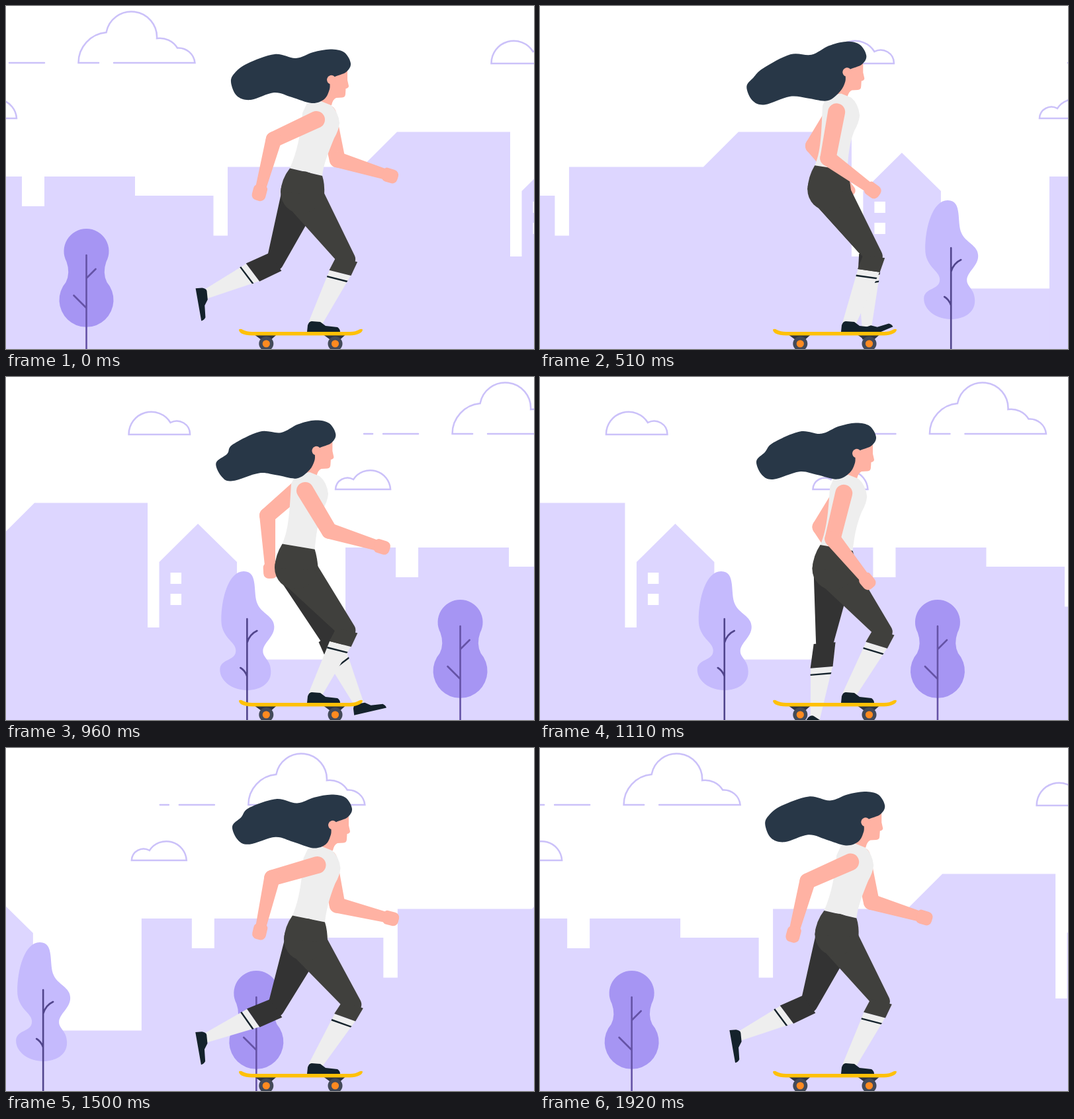
Recreate the animation shown at these times as an HTML page with a canvas. Size 798 by 519 pixels, loop 1950 ms.

```html
<!DOCTYPE html>
<html lang="en">
<head>
<meta charset="utf-8">
<title>Skateboarder</title>
<style>
  html, body { margin: 0; width: 100%; height: 100%; overflow: hidden; background: #fff; }
  canvas { display: block; }
</style>
</head>
<body>
<canvas id="stage" width="798" height="519"></canvas>
<script>
const ctx = document.getElementById('stage').getContext('2d');
const STEP = 30, STEPS = 65, LOOP = STEP * STEPS, SPAN = 1113;
const TIMES = [0, 300, 720, 960, 1260, 1500];

const SKIN = '#ffb2a3', HAIR = '#283747', SHIRT = '#eeeeee', SHOE = '#14222b';
const PANTS = '#40403d', PANTS_FAR = '#333333';
const CITY = '#ddd6ff', CLOUD = '#cbc1f9';

// Periodic, overshoot-free cubic interpolation between key values.
function track(...rows) {
  const n = rows.length;
  const time = j => TIMES[(j + n) % n] + Math.floor(j / n) * LOOP;
  const row = j => rows[(j + n) % n];
  return t => {
    let i = n - 1;
    while (TIMES[i] > t) i--;
    const h = time(i + 1) - time(i), u = (t - time(i)) / h, v = 1 - u;
    return row(i).map((a, d) => {
      const rate = j => (row(j + 1)[d] - row(j)[d]) / (time(j + 1) - time(j));
      const slope = (p, q) => p * q <= 0 ? 0 : 2 * p * q / (p + q);
      const b = row(i + 1)[d], r = rate(i);
      const m0 = slope(rate(i - 1), r) * h, m1 = slope(r, rate(i + 1)) * h;
      return a * v * v * (1 + 2 * u) + m0 * u * v * v + b * u * u * (3 - 2 * u) - m1 * u * u * v;
    });
  };
}

// Chest offset and hip place; the limbs are angles in degrees, clockwise from the right.
const chestAt = track([0, 0], [-16, -14], [-23, -7], [-17, 0], [-3, 6], [1.5, 5]);
const hipAt = track([447, 282], [439, 277], [435, 280], [438, 289], [449, 291], [452, 290]);
const armAt = track([155, 105], [136, 52], [68, 25], [59, 17], [154, 91], [164, 103]);
const farArmAt = track([78, 17], [100, 36], [137, 69], [139, 87], [98, 26], [79, 14]);
const pushAt = track([111, 155, 80], [50, 126, 3], [64, 68, -35], [65, 65, -13], [128, 138, 66], [113, 157, 80]);

const rad = deg => deg * Math.PI / 180;
const polar = ([x, y], deg, len) => [x + Math.cos(rad(deg)) * len, y + Math.sin(rad(deg)) * len];
const angle = (a, b) => Math.atan2(b[1] - a[1], b[0] - a[0]) * 180 / Math.PI;
const dist = (a, b) => Math.hypot(b[0] - a[0], b[1] - a[1]);

// Joint between two bones of known length, bending to the right.
function joint(a, b, la, lb) {
  const d = dist(a, b);
  const bend = Math.acos((la * la + d * d - lb * lb) / (2 * la * d));
  return polar(a, angle(a, b) - bend * 180 / Math.PI, la);
}

function fill(color, d) {
  ctx.fillStyle = color;
  d ? ctx.fill(new Path2D(d)) : ctx.fill();
}

function line(color, width, d) {
  ctx.strokeStyle = color;
  ctx.lineWidth = width;
  ctx.stroke(new Path2D(d));
}

function disc([x, y], r, color) {
  ctx.beginPath();
  ctx.arc(x, y, r, 0, 7);
  fill(color);
}

// Smooth closed curve through points.
function blob(points, color) {
  const n = points.length, p = i => points[(i + n) % n];
  ctx.beginPath();
  ctx.moveTo(...p(0));
  for (let i = 0; i < n; i++) {
    const [a, b, c, d] = [p(i - 1), p(i), p(i + 1), p(i + 2)];
    ctx.bezierCurveTo(b[0] + (c[0] - a[0]) / 6, b[1] + (c[1] - a[1]) / 6,
      c[0] - (d[0] - b[0]) / 6, c[1] - (d[1] - b[1]) / 6, ...c);
  }
  fill(color);
}

// Tapered limb with round ends.
function limb(a, ra, b, rb, color) {
  const dir = rad(angle(a, b)), off = Math.acos((ra - rb) / dist(a, b));
  ctx.beginPath();
  ctx.arc(...a, ra, dir + off, dir - off + 2 * Math.PI);
  ctx.arc(...b, rb, dir - off, dir + off);
  fill(color);
}

// Tapered limb with flat, slightly slanted ends.
function taper(a, ra, b, rb, color) {
  const across = angle(a, b) - 102;
  ctx.beginPath();
  ctx.moveTo(...polar(a, across, ra));
  ctx.lineTo(...polar(b, across, rb));
  ctx.lineTo(...polar(b, across, -rb));
  ctx.lineTo(...polar(a, across, -ra));
  fill(color);
}

function at([x, y], deg, draw) {
  ctx.save();
  ctx.translate(x, y);
  ctx.rotate(rad(deg));
  draw();
  ctx.restore();
}

function drawCity() {
  ctx.lineCap = 'round';
  line(CLOUD, 2.5, 'M140 86H109.5A46 46 0 0 1 151.5 40A38.6 38.6 0 0 1 228 49A31 31 0 0 1 259 63.5A25 25 0 0 1 285.5 86H163'
    + 'M-24 86H-11M5 86H58'
    + 'M733.5 87A34 34 0 0 1 796.5 69A20 20 0 0 1 826 87Z'
    + 'M-67 170A18 18 0 0 1 -40 155A30.5 30.5 0 0 1 16 170Z');
  fill(CITY, 'M-52 519V258H24V303H58V258H195V287H313.5V347.5H335V243.5H538L591 190.5H762V379H779.5V280L838 222L897 280V427.5H1062V519Z');
  fill('#fff', 'M796.5 296h16.5v17h-16.5zm0 32h16.5v17h-16.5z');
  at([912.3, 0], 0, () => {
    fill('#c5bafd', 'M-5 294C18 294 8 328 16 344C22 358 41 362 41 378C41 394 24 402 24 415C24 425 36 428 36 446C36 465 18 474 0 474C-22 474 -41 460 -41 443C-41 426 -17 430 -17 414C-17 400 -39 395 -39 368C-39 335 -28 294 -5 294Z');
    line('#51458c', 2.6, 'M0 366V519M0 402Q4 389 15 384M0 453Q-3 444 -10 440');
  });
  at([121.5, 0], 0, () => {
    fill('#a695f3', 'M0 337A34 34 0 0 1 30 387Q24 404 31 418A41 41 0 1 1 -31 418Q-24 404 -30 387A34 34 0 0 1 0 337Z');
    line('#6553a6', 2.6, 'M0 377V519M0 412L14 398M0 457L-19 438');
  });
}

function drawArm(shoulder, [upper, fore]) {
  const elbow = polar(shoulder, upper, 71);
  limb(shoulder, 13, elbow, 12, SKIN);
  limb(elbow, 12, polar(elbow, fore, 75), 8, SKIN);
  at(polar(elbow, fore, 83.5), fore, () => {
    ctx.beginPath();
    ctx.roundRect(-12, -10.5, 24, 21, [5, 8, 8, 7]);
    fill(SKIN);
  });
}

function drawLeg(hip, knee, ankle, hem, ankleWidth, footAngle, color) {
  const dir = angle(knee, ankle);
  const cuff = polar(knee, dir, hem), band = polar(cuff, dir, 9);
  taper(cuff, 16.5, ankle, ankleWidth, SHIRT);
  taper(band, 16, polar(band, dir, 2.5), 15.5, SHOE);
  limb(hip, 30, knee, 13, color);
  taper(knee, 16.5, cuff, 17, color);
  at(ankle, footAngle, () =>
    fill(SHOE, 'M-12 12L-11 2Q-9 -4 -5 -4L8 -3L16 3L34 5Q38 8 38 12Z'));
}

function drawBoard() {
  for (const x of [393.3, 497.5]) {
    fill('#2e3440', `M${x - 17} 498H${x + 15}L${x + 6} 506H${x - 6}Z`);
    disc([x, 511], 11, '#434a59');
    disc([x, 511], 5.6, '#ff8a20');
  }
  fill('#ffc107', 'M352 489.5Q355 488 358 490Q364 493 372 493H520Q528 493 534 489.5Q537 488 539 489.5Q539 493 534 495.5Q528 498.5 520 498.5H372Q362 498.5 356 495.5Q352 493 352 489.5Z');
}

function drawTorso([x, y], left, right) {
  ctx.beginPath();
  ctx.moveTo(...left);
  ctx.bezierCurveTo(left[0] + 11, left[1] - 24, x + 446, y + 190, x + 448, y + 162);
  ctx.lineTo(x + 455, y + 147);
  ctx.lineTo(x + 476, y + 144);
  ctx.lineTo(x + 491, y + 150);
  ctx.quadraticCurveTo(x + 502, y + 159, x + 504, y + 177);
  ctx.quadraticCurveTo(x + 503, y + 188, x + 496, y + 200);
  ctx.bezierCurveTo(x + 487, y + 222, right[0] + 2, right[1] - 18, ...right);
  fill(SHIRT);
}

function drawSeat(left, right, [x, y]) {
  disc([x, y], 32, PANTS);
  ctx.beginPath();
  ctx.moveTo(...left);
  ctx.lineTo(...right);
  ctx.quadraticCurveTo(right[0] + 4, right[1] + 12, x + 34, y + 4);
  ctx.lineTo(x - 32, y);
  ctx.quadraticCurveTo(x - 31, y - 20, ...left);
  fill(PANTS);
}

// The further from the head, the more the hair sags; its end curls three times a loop.
function drawHair(t, sag) {
  const curl = 5.5 - 5.5 * Math.cos(6 * Math.PI * t / LOOP);
  const tail = [[464, 70], [438, 79], [406, 73], [365, 87], [346 + curl, 101], [340, 115],
    [349, 136], [370 - curl / 2, 142], [405, 131], [432, 138], [462, 147]];
  const crown = [[481, 141], [489, 126], [490, 113], [497, 107], [514, 100], [521, 87], [511, 70], [490, 65.5]];
  const hang = ([x, y]) => [x, y + sag * Math.min(1, (y > 125 ? 0.3 : 0) + (475 - x) / 110)];
  blob([...tail.map(hang), ...crown], HAIR);
}

function draw(step) {
  const t = step * STEP;
  const chest = chestAt(t), hip = hipAt(t), [thigh, shin, foot] = pushAt(t), farArm = farArmAt(t);
  const head = [chest[0] * 1.33, chest[1]];
  const lean = chest[0] - (hip[0] - 447);
  const waistL = [hip[0] - 18 + lean * 0.3, hip[1] - 36.5];
  const waistR = [hip[0] + 31 + lean * 0.3, hip[1] - 25 + lean * 0.4];
  const shoulder = [chest[0] + 469, chest[1] + 172];
  const farShoulder = [chest[0] + 486 - (farArm[0] - 78) / 3, chest[1] + 163];
  const ankle = [467, 481], pushKnee = polar(hip, thigh, 113);

  ctx.fillStyle = '#fff';
  ctx.fillRect(0, 0, 798, 519);
  const scroll = SPAN * step / STEPS;
  for (const x of [-scroll, SPAN - scroll]) at([x, 0], 0, drawCity);

  drawArm(farShoulder, farArm);
  at(head, 0, () =>
    fill(SKIN, 'M494 103L516 98L516 112L518 121Q518 124 513.5 125L513 133Q513 138 508 138.5L499 139Q494 141 492 150L484 154L470 146L486 115Z'));
  drawLeg(hip, pushKnee, polar(pushKnee, shin, 117), 37, 7, foot, PANTS_FAR);
  drawBoard();
  drawTorso(chest, waistL, waistR);
  drawLeg(hip, joint(hip, ankle, 122, 109), ankle, 23, 10, 0, PANTS);
  drawSeat(waistL, waistR, hip);
  at(head, 0, () => {
    drawHair(t, -0.68 * head[0]);
    fill(SKIN, 'M498 109Q495 104 490 105Q485 107 485 112Q486 118 491 118L499 118Z');
  });
  drawArm(shoulder, armAt(t));
}

const start = performance.now();
function tick() {
  // A small lead keeps timer jitter from holding back a step.
  draw(Math.floor((performance.now() - start + 8) / STEP) % STEPS);
  requestAnimationFrame(tick);
}
tick();
</script>
</body>
</html>
```
